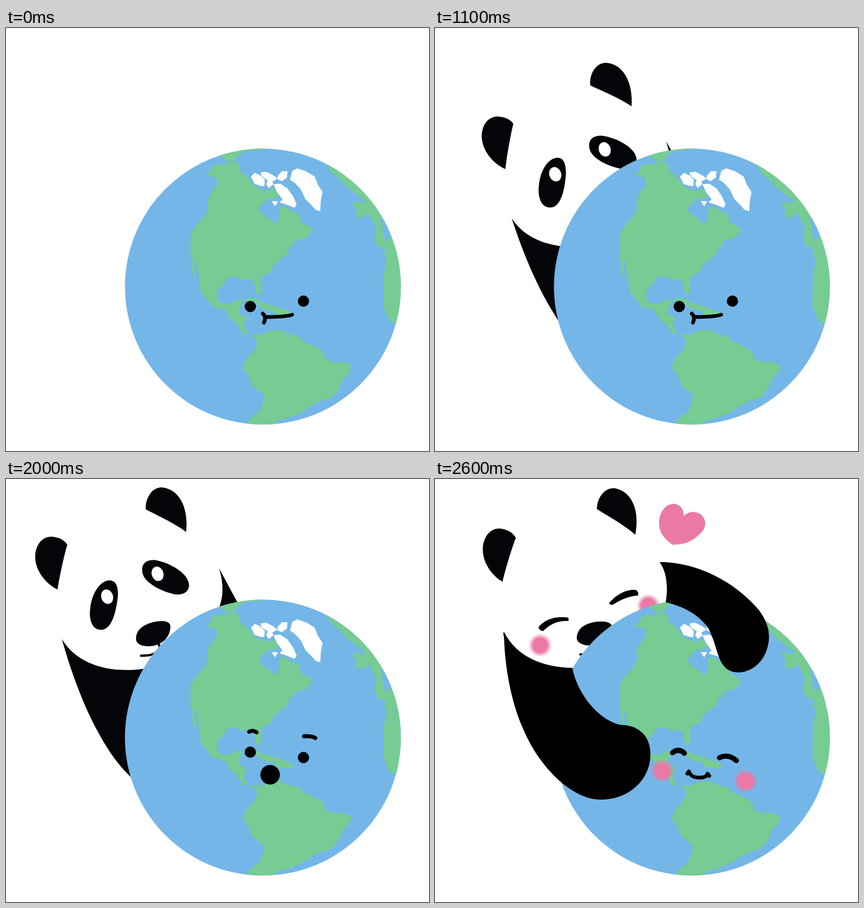
Write an HTML page that moves like this. It is 748 px wide and 748 px high and loops after 4.6 s.

```html
<!DOCTYPE html>
<html lang="en">
<head>
<meta charset="utf-8">
<title>Panda hugs the Earth</title>
<style>
  html, body { margin: 0; width: 100%; height: 100%; overflow: hidden; background: #fff; }
  svg { display: block; width: 100%; height: 100%; }
  .line { fill: none; stroke: #000; stroke-width: 7; stroke-linecap: round; stroke-linejoin: round; }
  .land { fill: #76cc92; stroke: #76cc92; stroke-width: 1.5; stroke-linejoin: round; }
  .ice { fill: #fff; stroke: #fff; stroke-width: 1.5; stroke-linejoin: round; }
</style>
</head>
<body>
<svg viewBox="0 0 748 748">
  <defs>
    <clipPath id="disc"><circle cx="454.3" cy="457.3" r="244"/></clipPath>
    <clipPath id="behind"><path d="M0 0H748V550H0Z"/></clipPath>
    <radialGradient id="blush">
      <stop offset=".58" stop-color="#eb78a5"/>
      <stop offset="1" stop-color="#eb78a5" stop-opacity="0"/>
    </radialGradient>
  </defs>

  <g clip-path="url(#behind)">
    <g id="panda" fill="#040508">
      <path d="M88 289C106 345 132 408 160 453C180 487 200 511 222 530L420 500V255L400 219Q380 186 361 153C370 180 372 205 360 232C340 285 295 325 243 334C180 348 118 335 88 289Z"/>
      <path d="M91 122C84 112 72 109 62 109C45 110 35 125 35 145C36 170 55 192 77 202C78 188 86 140 91 122Z"/>
      <path d="M227 54C225 35 236 14 255 14C285 16 303 48 300 91C278 76 250 65 227 54Z"/>
      <path d="M219 283C219 266 232 258 247 253C262 249 279 248 279 260C279 276 269 289 252 294C236 298 219 295 219 283Z"/>
      <path d="M259 291C264 296 261 301 256 306C250 311 242 312 229 313M262 296L270 301" class="line" style="stroke-width:4"/>
      <g id="pandaEyes">
        <path d="M168 182C182 181 186 198 183 220C180 248 172 270 156 270C140 270 134 252 136 232C138 205 152 183 168 182Z"/>
        <path d="M225 162C224 148 234 142 248 143C272 146 309 164 309 186C308 198 298 203 284 202C262 198 226 184 225 162Z"/>
        <g fill="#fff">
          <ellipse cx="165" cy="211" rx="10.5" ry="13" transform="rotate(-20 165 211)"/>
          <ellipse cx="252.5" cy="167" rx="10.5" ry="13" transform="rotate(-20 252.5 167)"/>
        </g>
      </g>
    </g>
  </g>
  <path id="pandaClosed" d="M183 262C195 247 215 242 235 245Q238 249 235 251C220 250 205 255 191 269Q184 268 183 262ZM308 219C322 203 338 195 355 196Q361 200 359 206C345 207 330 212 315 222Q309 224 308 219Z"/>
  <g class="cheeks" fill="url(#blush)">
    <circle cx="186" cy="294" r="21"/><circle cx="377.5" cy="224" r="21"/>
  </g>

  <g clip-path="url(#disc)">
    <path fill="#74b6e8" d="M200 200H710V710H200Z"/>
    <g class="land">
      <path d="M355 260L361 254L366 244L376 241L389 242L398 237L408 238L413 247L412 255L420 258L432 270L440 281L453 287L466 288L470 284L479 290L481 296L475 301L464 301L456 308L446 318L447 323L457 333L468 340L473 347L481 344L483 336L485 316L493 316L500 322L517 329L521 345L537 352L540 360L530 371L510 375L508 384L498 388L500 397L490 405L327 405V365L334 352L350 335L358 322L357 303L368 285L375 277L372 264Z"/>
      <path d="M327 400L495 400L472 420L468 431L453 437L450 446L451 466L446 471L441 463L440 449L430 443L415 444L408 438L390 441L385 452L374 462L372 478L378 487L395 489L405 483L416 480L415 490L411 500V507L421 509L424 515L420 522L421 530L427 541L419 540L410 524L398 515L387 497L366 492L356 478L345 468L343 450L338 420L335 408H331L335 442L330 428Z"/>
      <path d="M420 482L430 478L442 479L452 486L470 491L490 498L503 503L508 509L490 511L475 507L476 500L462 499L449 492L440 484Z"/>
      <path d="M432 545L443 541L447 545L458 540L470 535H488L494 540L520 547L523 554L540 561L560 572L564 586L578 591L601 592L610 598L606 610L595 620L588 638L575 653L555 659L540 667L520 680L500 688L480 694L470 701L454 705L426 703L432 690L447 680L455 662L457 648L436 632L430 615L419 600L427 583L440 570L445 556L442 546Z"/>
      <path d="M378 225L386 230L392 236L402 234L410 225L420 217L456 214L440 200L378 210Z"/>
      <path d="M569 242L576 255L592 268L605 283L618 292L632 302L636 309L631 312L620 307L613 312L622 319L618 330L627 336L636 331L640 325L646 335L655 352L652 373L658 385L668 391L674 386L670 400L674 412L669 435L668 490L675 510L684 521L715 522L715 240Z"/>
    </g>
    <path fill="#74b6e8" d="M661 338L666 347L665 358L672 378L681 367L700 355L672 330Z"/>
    <g class="ice">
      <path d="M507 253L515 249L530 254L545 263L551 278L559 290L556 305L555 323L548 321L540 312L530 302L522 285L510 272L503 268Z"/>
      <path d="M434 263L440 257L449 261L457 269L456 279L449 278L440 275Z"/>
      <path d="M451 256L460 255L472 261L479 266L470 271L472 276L465 282L461 276L464 269L453 262Z"/>
      <path d="M481 262L488 254L497 254L496 264L488 270L481 267Z"/>
      <path d="M474 277L485 276L497 284L507 298L513 312L510 317L495 311L485 308L490 303L480 290Z"/>
      <path d="M471 307L480 307L476 314Z"/>
    </g>
  </g>

  <g class="cheeks" fill="url(#blush)">
    <circle cx="401.5" cy="516" r="21"/><circle cx="549" cy="534" r="21"/>
  </g>
  <circle id="eyeL" cx="432" r="10"/>
  <circle id="eyeR" cx="526" r="10"/>
  <path id="brows" class="line" d="M430 447Q437 443 443 448M527 455Q540 454 547 458"/>
  <path id="mouthSide" class="line" style="stroke-width:6.5" d="M454 505Q461 511 456 521M459 511Q495 511 506 507"/>
  <path id="mouthFlat" class="line" style="stroke-width:6.5" d="M451 505Q456 510 455 523M455 512Q480 515 506 510M506.5 503V517"/>
  <circle id="mouthOpen" cx="467" cy="523" r="17.3"/>
  <g id="happy" class="line">
    <path style="stroke-width:9" d="M420 484Q431 475 441 485M503 493Q518 485 533 498"/>
    <path style="stroke-width:6.5" d="M446 521L449 517Q452 528 467 528Q481 528 482 521L485 525"/>
  </g>

  <path id="armL"/>
  <path id="armR"/>
  <path id="heart" fill="#eb79a6" d="M440 66C447 57 460 56 469 62C479 70 481 82 473 92C460 107 445 117 420 116C400 103 392 85 398 65C403 48 418 40 430 46C437 50 440 57 440 66Z"/>
</svg>
<script>
  const LOOP = 4600, STEP = 100;
  const $ = id => document.getElementById(id);
  const clamp = v => Math.max(0, Math.min(1, v));
  const show = (id, on) => $(id).setAttribute('visibility', on ? 'visible' : 'hidden');

  // Each arm has a reaching pose and a hugging pose with matching segments.
  const arms = {
    armL: [
      'M124 290C92 325 83 365 83 405C84 470 115 503 152 503C175 503 190 495 196 482C200 470 180 420 165 390C155 360 165 340 180 325C160 322 140 305 124 290Z',
      'M122 270C122 320 132 388 155 440C183 508 241 567 293 567C345 567 381 530 381 487C381 450 355 435 330 435C295 430 253 385 243 335C200 335 145 318 122 270Z'
    ],
    armR: [
      'M402 157C435 150 470 152 492 163C515 173 530 190 529 213C529 238 515 252 498 252C488 252 475 245 460 234C448 224 430 215 409 218C412 197 411 175 402 157Z',
      'M397 147C450 146 522 172 573 232C590 255 593 275 589 293C583 325 558 342 537 342C499 342 503 303 484 265C466 238 435 224 408 218C412 195 411 165 397 147Z'
    ]
  };

  function morph([from, to], p) {
    const ends = to.match(/\d+/g);
    let i = 0;
    return from.replace(/\d+/g, n => (+n + (ends[i++] - n) * p).toFixed(1));
  }

  function render(time) {
    const tick = Math.floor((time % LOOP) / STEP);
    const offset = 23.8 * Math.max(0, 13 - tick);
    const tilt = clamp((tick - 19) / 3);
    const hug = Math.min(1, (tick - 22) / 3);
    const glad = tick >= 25;
    const met = tick >= 14;

    show('panda', tick >= 5);
    $('panda').setAttribute('transform',
      `translate(${offset + 67.3 * tilt} ${offset - 28 * tilt}) rotate(${6.9 * tilt})`);
    $('pandaEyes').setAttribute('visibility', glad ? 'hidden' : 'inherit');
    show('pandaClosed', glad);

    for (const id in arms) {
      show(id, tick >= 21);
      $(id).setAttribute('d', morph(arms[id], Math.max(hug, -1 / 3)));
    }
    const blush = clamp((tick - 21) / 5);
    document.querySelectorAll('.cheeks').forEach(g => g.setAttribute('opacity', blush));

    $('eyeL').setAttribute('cy', met ? 483 : 492.5);
    $('eyeR').setAttribute('cy', met ? 492.5 : 483);
    show('eyeL', !glad);
    show('eyeR', !glad);
    show('brows', tick >= 15 && !glad);
    show('mouthSide', !met);
    show('mouthFlat', met && tick < 20);
    show('mouthOpen', tick >= 20 && !glad);
    show('happy', glad);
    show('heart', tick >= 26);
  }

  const start = performance.now();
  function frame() {
    render(performance.now() - start);
    requestAnimationFrame(frame);
  }
  frame();
</script>
</body>
</html>
```
